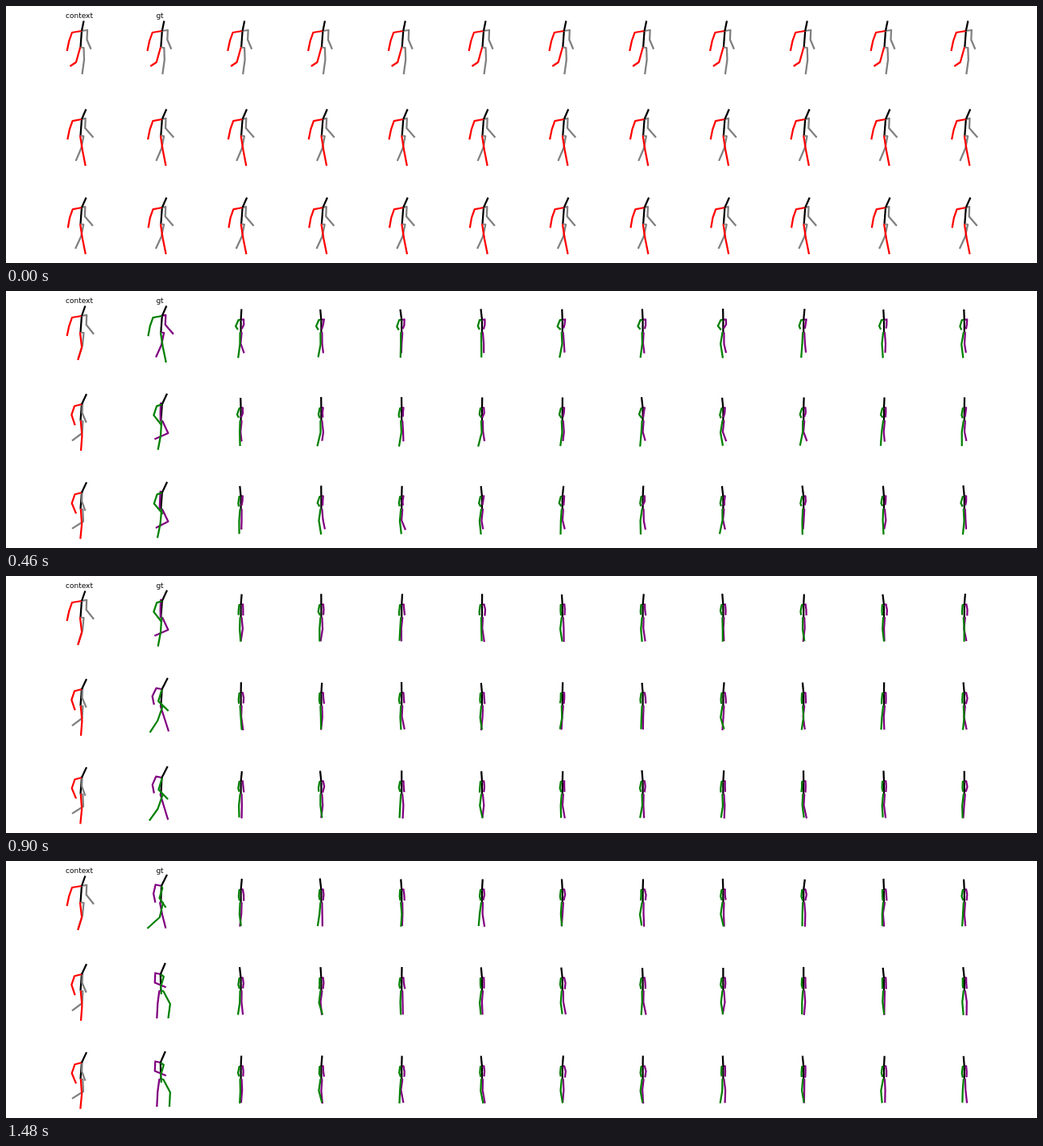
An HTML page with a canvas for the animation above (1.5 s loop, 1280 by 320 pixels).

```html
<!DOCTYPE html>
<html lang="en">
<head>
<meta charset="utf-8">
<title>Pose forecasts</title>
<style>
html, body { margin: 0; width: 1280px; height: 320px; overflow: hidden; background: #fff; }
canvas, svg { position: absolute; left: 0; top: 0; }
text { font: 9px "DejaVu Sans", sans-serif; text-anchor: middle; }
</style>
</head>
<body>
<canvas id="stage" width="1280" height="320"></canvas>
<svg width="1280" height="320"><text x="91" y="15">context</text><text x="191" y="15">gt</text></svg>
<script>
const LOOP = 1500, STEP = 20, SEAM = 300;
const COLS = 12, DX = 99.8, DY = 110;
// All rows show one walk, entered at different moments.
const ROW_START = [0, 440, 470];
const PAST = { l: 'gray', r: 'red' }, FUTURE = { l: 'purple', r: 'green' };

const bones = [
  ['k', 'pelvis', 'neck'],
  ['l', 'neck', 'lShoulder', 'lElbow', 'lWrist'],
  ['r', 'neck', 'rShoulder', 'rElbow', 'rWrist'],
  ['l', 'pelvis', 'lHip', 'lKnee', 'lAnkle'],
  ['r', 'pelvis', 'rHip', 'rKnee', 'rAnkle'],
  ['k', 'neck', 'head']
];

const mix = (a, b, u) => a + (b - a) * u;
const line = (t, a, b) => Math.min(1, Math.max(0, (t - a) / (b - a)));
const ramp = (t, a, b) => {
  const u = line(t, a, b);
  return u * u * (3 - 2 * u);
};

// The body turns while arms and legs swing; positions are for the first column.
function walk(t) {
  const s = (a, b) => ramp(t, a, b), l = (a, b) => line(t, a, b);
  const turnR = s(250, 1800), turnL = s(60, 1620);
  const rx = 82 + 14 * turnR, ry = 33 + turnR;
  const lx = 101 - 15.5 * turnL, ly = 30 - 0.5 * turnL;
  const forward = s(900, 1240) - s(1260, 1650);
  return {
    pelvis: [92.5, 51.5],
    neck: [94 - 2 * s(1250, 1750), 31],
    head: [96 + 4 * s(-200, 650) + s(800, 1200) - 3 * s(1300, 1800), 18.5 - 1.5 * s(400, 1500)],
    rShoulder: [rx, ry],
    rElbow: [rx - 3.7, ry + 10.5 + 2 * turnR],
    rWrist: [75.7 + 26.8 * s(360, 1230) - 9.5 * s(1260, 1760),
      56 + 2 * s(300, 1100) - 2 * s(1480, 1700)],
    lShoulder: [lx, ly],
    lElbow: [lx - 0.5 - 5 * forward, ly + 12 - 2 * forward],
    lWrist: [105.5 + 3.5 * s(0, 180) - 25 * s(360, 1230) + 15 * s(1360, 1950),
      53.7 - 3.5 * s(700, 1200) + 3.5 * s(1300, 1700) - 6.5 * s(1700, 1930)],
    rHip: [92 + 3.5 * turnR, 52],
    rKnee: [87 + 8 * s(0, 350) - 6.5 * s(600, 1260) + 15.5 * s(1340, 1880), 70 - 2 * s(1700, 1900)],
    rAnkle: [79.5 + 19.5 * s(90, 470) - 23.4 * l(460, 1480) + 28.5 * s(1560, 2000),
      75 + 14 * s(0, 400) - 5 * l(700, 1480) - 2 * s(1480, 1620) + 4 * s(1650, 1960)],
    lHip: [96.5 - 6 * s(300, 1850), 52],
    lKnee: [97 - 4.5 * s(0, 620) + 9 * s(640, 900) - 13 * s(930, 1950), 67],
    lAnkle: [94.5 - 12.5 * l(0, 700) + 22 * s(800, 1270) - 16.5 * l(1270, 1900),
      85 - 10.5 * s(250, 900) + 9 * s(890, 1210) + 2.5 * s(1400, 1800)]
  };
}

function stand(t, row) {
  const late = ramp(t, 460, 800), sag = ramp(t, 900, 1200) - ramp(t, 1300, 1470);
  const wide = row ? 1 : 1.5 - 0.5 * line(t, 460, 1000);
  const arm = (dx, y) => [92 + dx * wide, y];
  return {
    pelvis: [92, 51.5],
    neck: [92, 36 + sag],
    head: [91.8, 22.5 - 0.5 * sag],
    rShoulder: arm(-2, 36 + sag),
    rElbow: arm(-4 + 1.2 * late, 44 + 2 * sag),
    rWrist: arm(-2 + sag, 48 + late + 2 * sag),
    lShoulder: arm(2.3 - 0.7 * sag, 35.3 + 1.5 * sag),
    lElbow: arm(2 + late, 42 + 2 * sag),
    lWrist: arm(1 + 1.7 * late, 47 + 2 * late + sag),
    rHip: [91, 52],
    rKnee: [90.3, 66],
    rAnkle: [89.5 + 1.3 * late + 1.2 * sag, 83 - 1.8 * late - 4 * sag],
    lHip: [93, 52],
    lKnee: [92.8 - sag, 65.5],
    lAnkle: [94 - 0.8 * late, 77 + 4.5 * late - 4 * sag]
  };
}

const sway = { head: 1.5, Elbow: 0.8, Wrist: 1.1, Knee: 1.7, Ankle: 2.6 };

function hash(a, b) {
  const v = Math.sin(a * 127.1 + b * 311.7) * 43758.5453;
  return 2 * (v - Math.floor(v)) - 1;
}
// Smooth noise whose spread stays even between lattice points.
function drift(seed, t) {
  const u = t / 90, i = Math.floor(u), a = (u - i) * Math.PI / 2;
  return hash(seed, i) * Math.cos(a) + hash(seed, i + 1) * Math.sin(a);
}

function forecast(row, col, t, from) {
  const out = stand(t, row), settle = ramp(t, SEAM - 20, SEAM + 40);
  Object.keys(out).forEach((name, j) => {
    const p = out[name], amp = sway[name.replace(/^[lr]/, '')] || 0;
    const seed = (row * COLS + col) * 31 + j * 2;
    p[0] = mix(from[name][0], p[0] + amp * drift(seed, t), settle);
    p[1] = mix(from[name][1], p[1] + Math.min(amp, 1) * 0.6 * drift(seed + 1, t), settle);
  });
  return out;
}

const ctx = document.getElementById('stage').getContext('2d');
ctx.lineWidth = 2.25;
ctx.lineJoin = 'round';

function figure(p, dx, dy, colors) {
  for (const [side, ...chain] of bones) {
    ctx.strokeStyle = colors[side] || '#000';
    ctx.beginPath();
    for (const name of chain) ctx.lineTo(p[name][0] + dx, p[name][1] + dy);
    ctx.stroke();
  }
}

function draw(t) {
  ctx.clearRect(0, 0, 1280, 320);
  const past = t < SEAM, held = Math.min(t, SEAM - STEP);
  ROW_START.forEach((start, row) => {
    const seen = walk(start + held), truth = walk(start + t);
    for (let col = 0; col < COLS; col++) {
      const p = col === 0 ? seen : past || col === 1 ? truth : forecast(row, col, t, seen);
      figure(p, col * DX, row * DY, past || col === 0 ? PAST : FUTURE);
    }
  });
}

const begun = performance.now();
function tick() {
  const t = (performance.now() - begun) % LOOP;
  draw(Math.floor(t / STEP) * STEP);
  requestAnimationFrame(tick);
}
tick();
</script>
</body>
</html>
```
